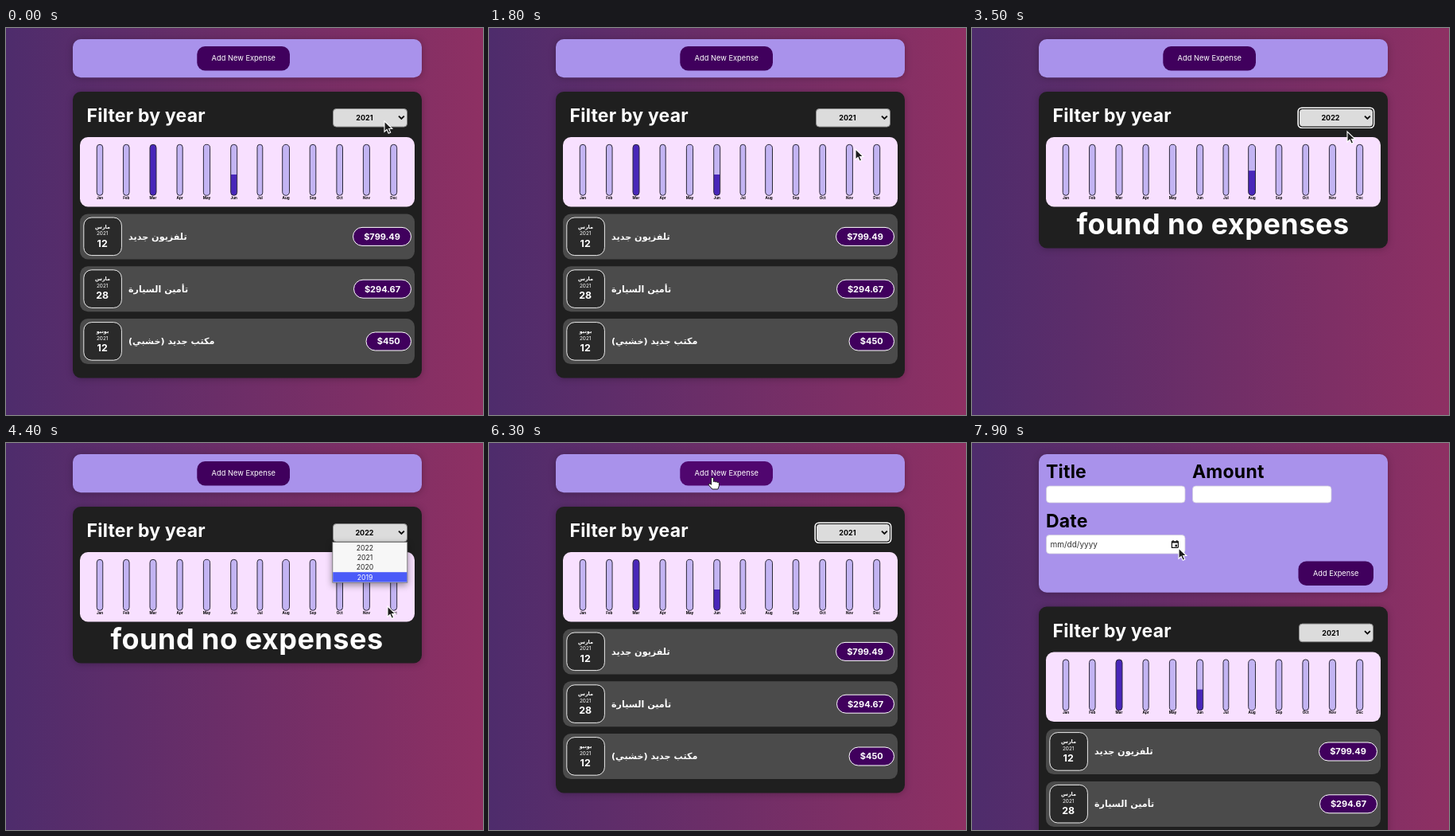
These frames come from a looping animation (600 px wide and 486 px high, 8 s). An HTML page:

```html
<!DOCTYPE html>
<html lang="en">
<head>
<meta charset="utf-8">
<title>Expenses</title>
<style>
  html, body { margin: 0; width: 100%; height: 100%; overflow: hidden; background: #6b2d68; }
  svg { display: block; width: 100vw; height: 100vh; }
  text { font-family: Inter, "DejaVu Sans", sans-serif; white-space: pre; }
  .b { font-weight: 700; }
  .ar { font-family: "DejaVu Sans", sans-serif; font-weight: 700; }
  .mid { text-anchor: middle; }
  .soft { filter: drop-shadow(0 1px 4px rgba(0, 0, 0, .25)); }
  .menu { filter: drop-shadow(0 3px 4px rgba(0, 0, 0, .4)); }
</style>
</head>
<body>
<svg viewBox="0 0 600 486">
  <defs>
    <linearGradient id="bg">
      <stop offset="0" stop-color="#4e2c6c"/>
      <stop offset="1" stop-color="#8e3063"/>
    </linearGradient>
  </defs>
  <rect width="600" height="486" fill="url(#bg)"/>
  <g id="scene"></g>
</svg>
<script>
const LOOP = 8000, STEP = 100;
const PURPLE = '#40005d';
const MONTHS = 'Jan Feb Mar Apr May Jun Jul Aug Sep Oct Nov Dec'.split(' ');
const BAR_X = [118, 151.3, 185, 218.6, 252.5, 286.7, 319.4, 352.1, 386, 419.7, 453.4, 487.7];
const BAR_W = [7.5, 7.5, 8, 7.2, 8.2, 8, 6.8, 8.8, 7.6, 7.6, 8, 8];
const OPTIONS = [2022, 2021, 2020, 2019];
const ROW = 12.4, MENU_Y = 125;

// pill is the width of the price badge
const EXPENSES = [
  { year: 2021, m: 2, month: 'مارس', day: 12, title: 'تلفزيون جديد', sum: 799.49, price: '$799.49', pill: 73 },
  { year: 2021, m: 2, month: 'مارس', day: 28, title: 'تأمين السيارة', sum: 294.67, price: '$294.67', pill: 72 },
  { year: 2021, m: 5, month: 'يونيو', day: 12, title: 'مكتب جديد (خشبي)', sum: 450, price: '$450', pill: 56.5 },
  { year: 2020, m: 7, month: 'أغسطس', day: 14, title: 'ورق التواليت', sum: 94.12, price: '$94.12', pill: 63.5 },
];

const YEARS = [[0, 2021], [1900, 2020], [3500, 2022], [5400, 2021]];
const OPEN = [[700, 1800], [2600, 3500], [4100, 5300]];
const FOCUS = [[1900, 2600], [3500, 4100], [5400, 6700]];
const FORM_AT = 6700;
const PATH = [
  [0, 476, 117], [700, 476, 117], [900, 486, 145], [1100, 478, 192], [1400, 461, 152],
  [1900, 461, 152], [2400, 474, 120], [2800, 474, 120], [3000, 496, 154], [3200, 472, 130],
  [3500, 472, 130], [3800, 472, 116], [4100, 472, 116], [4400, 480, 205], [4700, 466, 141],
  [5400, 466, 141], [6100, 283, 46], [6200, 283, 46], [6300, 281, 43], [6500, 281, 46],
  [6700, 281, 46], [7300, 231, 64], [7600, 231, 64], [7700, 240, 90], [7800, 254, 119], [7900, 260, 132],
];

const within = (spans, t) => spans.some(([a, b]) => t >= a && t < b);
const clamp = (v, a, b) => Math.min(b, Math.max(a, v));
const bez = (a, b, u) => 3 * a * u * (1 - u) ** 2 + 3 * b * u * u * (1 - u) + u ** 3;

// CSS "ease"
function ease(x) {
  if (x <= 0 || x >= 1) return clamp(x, 0, 1);
  let lo = 0, hi = 1;
  for (let i = 0; i < 20; i++) {
    const mid = (lo + hi) / 2;
    if (bez(.25, .25, mid) < x) lo = mid; else hi = mid;
  }
  return bez(.1, 1, lo);
}

function pointer(t) {
  const i = PATH.findIndex(p => p[0] > t);
  if (i < 0) return PATH[PATH.length - 1].slice(1);
  const [t0, x0, y0] = PATH[i - 1], [t1, x1, y1] = PATH[i];
  const k = (t - t0) / (t1 - t0);
  return [x0 + (x1 - x0) * k, y0 + (y1 - y0) * k];
}

const box = (x, y, w, h, r, fill, more = '') =>
  `<rect x="${x}" y="${y}" width="${w}" height="${h}" rx="${r}" fill="${fill}" ${more}/>`;
const text = (x, y, size, str, cls = '', fill = '#fff', more = '') =>
  `<text x="${x}" y="${y}" font-size="${size}" class="${cls}" fill="${fill}" ${more}>${str}</text>`;
const heading = (x, y, str, fill) => text(x, y, 23, str, 'b', fill, 'letter-spacing=".2"');

function shares(year) {
  const sums = MONTHS.map((_, m) => EXPENSES
    .filter(e => e.year === year && e.m === m)
    .reduce((s, e) => s + e.sum, 0));
  const top = Math.max(...sums) || 1;
  return sums.map(s => s / top);
}

function chart(from, to, k) {
  const a = shares(from), b = shares(to);
  return box(93, 137, 421, 87.5, 10, '#f8e0ff') + MONTHS.map((name, i) => {
    const x = BAR_X[i] - BAR_W[i] / 2, w = BAR_W[i], r = w / 2;
    const h = 64 * (a[i] + (b[i] - a[i]) * k);
    return `<clipPath id="c${i}">${box(x, 146.3, w, 64, r, '#000')}</clipPath>` +
      box(x, 146.3, w, 64, r, '#c3b4f3') +
      box(x, 210.3 - h, w, h, 0, '#4826b9', `clip-path="url(#c${i})"`) +
      box(x, 146.3, w, 64, r, 'none', 'stroke="#2c2838"') +
      text(BAR_X[i], 214.8, 4.6, name, 'b mid', '#000');
  }).join('');
}

function item(e, i) {
  return `<g transform="translate(0 ${i * 65.8})">` +
    box(93, 233.5, 421, 57, 10, '#4b4b4b') +
    box(97.8, 238, 47.6, 47.6, 10, '#2a2a2a', 'stroke="#fff" stroke-width=".9"') +
    text(121.5, 251.5, 6.5, e.month, 'ar mid') +
    text(121.2, 260.2, 6.4, e.year, 'mid') +
    text(121.2, 274.6, 12.4, e.day, 'b mid') +
    text(154, 265.8, 11.2, e.title, 'ar') +
    box(509.5 - e.pill, 250.4, e.pill, 23, 11.5, PURPLE, 'stroke="#fff"') +
    text(509.5 - e.pill / 2, 265.8, 11, e.price, 'b mid') + '</g>';
}

function select(year, focused) {
  return (focused ? box(410.2, 100.2, 95.4, 25, 4.5, '#101010', 'stroke="#fff" stroke-width="1.6"') : '') +
    box(411.5, 101.5, 93, 22.6, 4, '#dcdcdc', `stroke="${focused ? '#101010' : '#8a8a8a'}"`) +
    text(451, 116, 9, year, 'b mid', '#000') +
    '<path d="M494 110.6l3.4 3.4 3.4-3.4" fill="none" stroke="#000" stroke-width="1.8"/>';
}

function menu(year, y) {
  const hover = y < MENU_Y ? OPTIONS.indexOf(year) : clamp(Math.floor((y - MENU_Y) / ROW), 0, 3);
  return `<g class="menu">${box(410.8, 124.6, 94, 50.6, 0, '#f7f7f7', 'stroke="#6c6c6c" stroke-width=".8"')}</g>` +
    OPTIONS.map((o, i) => {
      const top = MENU_Y + i * ROW, on = i === hover;
      return (on ? box(411.2, top, 93.2, ROW, 0, '#4b5bf8') : '') +
        text(451.5, top + 9.6, 8.7, o, 'mid', on ? '#fff' : '#222');
    }).join('');
}

function card(t, y) {
  const n = YEARS.filter(s => s[0] <= t).length - 1;
  const [start, year] = YEARS[n];
  const from = YEARS[Math.max(0, n - 1)][1];
  const list = EXPENSES.filter(e => e.year === year);
  const height = list.length ? 162 + list.length * 65.8 : 196.5;
  return `<g class="soft">${box(84, 80, 439, height, 10, '#1f1f1f')}</g>` +
    heading(101.5, 118.4, 'Filter by year', '#fff') +
    select(year, within(FOCUS, t)) +
    chart(from, year, n ? ease((t - start + 90) / 300) : 1) +
    (list.length ? list.map(item).join('')
      : text(303, 259, 36, 'found no expenses', 'b mid', '#fff', 'letter-spacing=".5"')) +
    (within(OPEN, t) ? menu(year, y) : '');
}

function form() {
  const field = (x, y, h) => box(x + .5, y, 174.5, h, 4, '#fff', 'stroke="#cfcbdc" stroke-width=".8"');
  return `<g class="soft">${box(84, 14, 439, 173.8, 10, '#a992eb')}</g>` +
    heading(93, 44, 'Title', '#000') + heading(277, 44, 'Amount', '#000') + heading(93, 105.5, 'Date', '#000') +
    field(93, 54, 21) + field(277, 54, 21) + field(93, 115.6, 23.4) +
    text(98.5, 131, 10, 'mm/dd/yyyy', '', '#333') +
    '<path d="M251.4 123.8h8v7.6h-8zM251.4 124.9h8M253 122v2M257.8 122v2" fill="none" stroke="#111" stroke-width="1.2"/>' +
    box(255.5, 127.6, 2.5, 2.5, 0, '#111') +
    box(410.5, 148.5, 94.5, 30.5, 10, PURPLE) +
    text(457.7, 167, 9.2, 'Add Expense', 'mid');
}

function bar(hover) {
  return `<g class="soft">${box(84, 14, 439, 48.2, 10, '#a992eb')}</g>` +
    box(240.3, 23, 116.7, 30.4, 10, hover ? '#50066f' : PURPLE) +
    text(298.8, 41.4, 9.3, 'Add New Expense', 'mid');
}

const CURSORS = {
  arrow: '<path d="M0 0v13.2l3.1-2.7 2.1 4.8 2.5-1.1-2.1-4.7h4.2z" fill="#1c1c1c" stroke="#fff" stroke-width="1.1"/>',
  hand: '<path d="M-1.4 1.2q1.4-2 2.8 0v4.4q1.3-1 2.4.3 1.4-.9 2.3.5 1.9-.5 2.3 1.2v3.2l-1.5 4.2h-7l-4.6-5.2q-.3-2 1.6-1.8l1.7 1.3z" fill="#fff" stroke="#1c1c1c"/>',
  beam: '<path d="M-3-7q3 0 3 2v10q0 2-3 2M3-7q-3 0-3 2M0 5q0 2 3 2" fill="none" stroke="#fff" stroke-width="2.4"/>' +
    '<path d="M-3-7q3 0 3 2v10q0 2-3 2M3-7q-3 0-3 2M0 5q0 2 3 2" fill="none" stroke="#1c1c1c" stroke-width="1.1"/>',
};

function draw(t) {
  const [x, y] = pointer(t);
  const hasForm = t >= FORM_AT;
  const onButton = !hasForm && x > 240 && x < 357 && y > 23 && y < 54;
  const onField = hasForm && x < 268 && y > 54 && y < 75;
  const kind = onButton ? 'hand' : onField ? 'beam' : 'arrow';
  return (hasForm ? form() : bar(onButton)) +
    `<g transform="translate(0 ${hasForm ? 125.6 : 0})">${card(t, y)}</g>` +
    `<g transform="translate(${x} ${y})">${CURSORS[kind]}</g>`;
}

const scene = document.getElementById('scene');
const began = performance.now();
let shown = -1;

function tick() {
  const t = Math.floor((performance.now() - began) % LOOP / STEP) * STEP;
  if (t !== shown) scene.innerHTML = draw(shown = t);
  requestAnimationFrame(tick);
}
tick();
</script>
</body>
</html>
```
